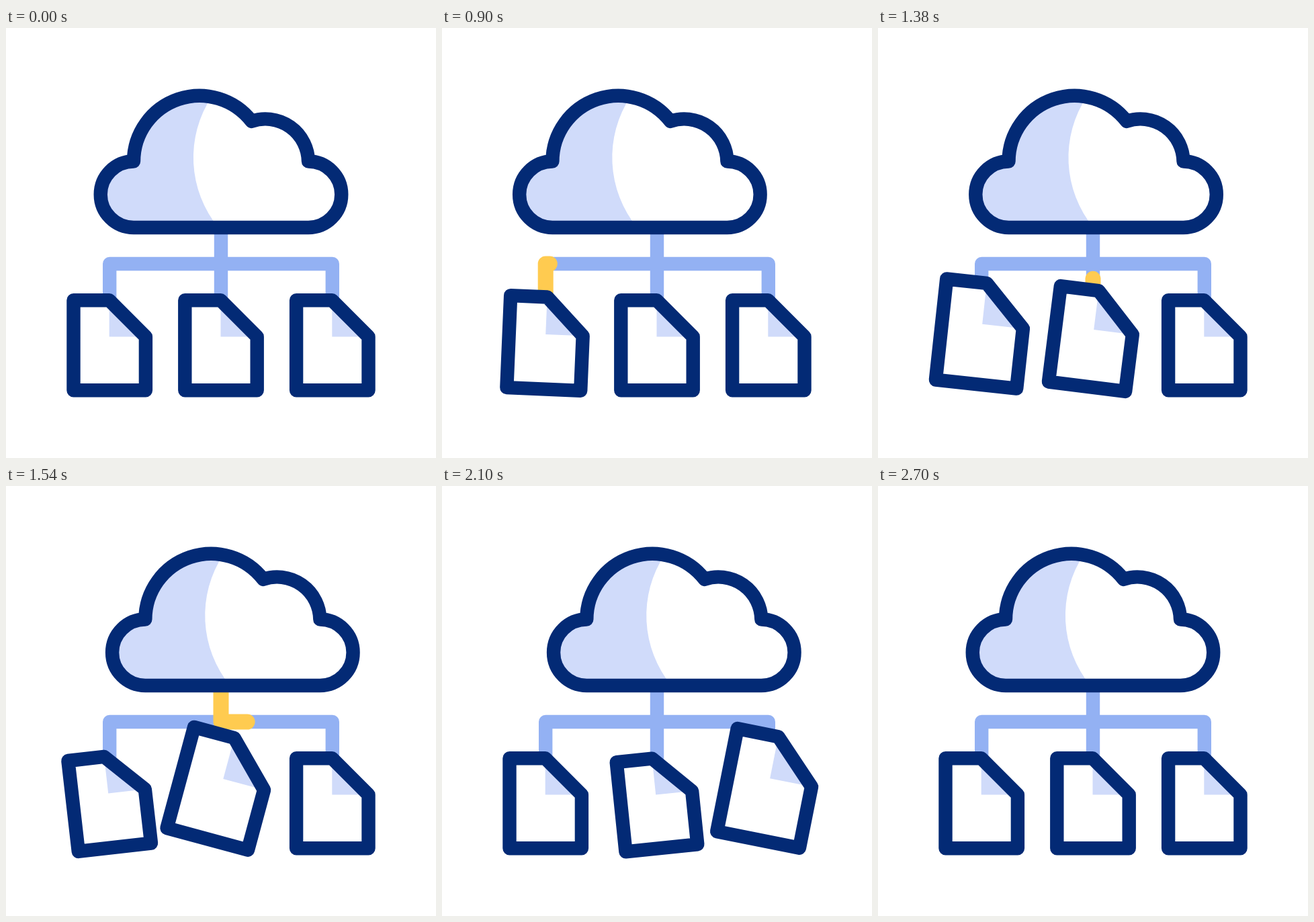
Animation of 640 by 640 pixels, one loop 3000 ms. Source, as an HTML page with a canvas:

```html
<!DOCTYPE html>
<html>
<head>
<meta charset="utf-8">
<style>
  html, body { margin: 0; height: 100%; overflow: hidden; background: #fff; }
  canvas { display: block; }
</style>
</head>
<body>
<canvas id="stage" width="640" height="640"></canvas>
<script>
const ctx = document.getElementById('stage').getContext('2d');
const NAVY = '#032a75', BLUE = '#93b1f3', PALE = '#d0dbfa', YELLOW = '#ffcb50';
const LINE = 20.4, LOOP = 3000;

const cloud = new Path2D('M190 297A49.2 49.2 0 0 1 190 198.5A98 98 0 0 1 365.5 138.8' +
  'A64 64 0 0 1 450 198.5A49.2 49.2 0 0 1 450 297Z');
const cloudShade = new Path2D('M316 297H190A49.2 49.2 0 0 1 190 198.5A98 98 0 0 1 306 102.2' +
  'A165 165 0 0 0 316 297Z');
const wires = new Path2D('M320 297V405M154.2 405V351H485.8V405');

const pageX = [154.2, 320, 485.8], PAGE_Y = 472.2;
const page = [[-53.7, -67], [-0.5, -67], [53.7, -12.7], [53.7, 67], [-53.7, 67]];
const fold = [[-0.5, -67], [-0.5, -12.7], [53.7, -12.7]];

// Keys are [time, value] pairs, eased in and out between neighbours.
function track(keys, t) {
  if (t <= keys[0][0]) return keys[0][1];
  for (let i = 1; i < keys.length; i++) {
    const [t0, a] = keys[i - 1], [t1, b] = keys[i];
    if (t < t1) {
      const p = (t - t0) / (t1 - t0);
      return a + (b - a) * p * p * (3 - 2 * p);
    }
  }
  return keys[keys.length - 1][1];
}

const cloudShift = [[220, 0], [860, -25.6], [900, -25.6], [1760, 25.6], [2060, 25.6], [2700, 0]];
const pageLift = [[800, 0], [1250, 1], [1600, 0]];
const pageTurn = [[800, 0], [1210, 16], [1600, -8], [1930, 0]];
const pulseHead = [[400, 0], [760, 1]];
const pulseTail = [[650, 0], [1010, 1]];

function stroke(path, color, width) {
  ctx.strokeStyle = color;
  ctx.lineWidth = width;
  ctx.stroke(path);
}

function drawPulse(x, t) {
  const length = 108 + Math.abs(x - 320);
  const head = track(pulseHead, t) * length, tail = track(pulseTail, t) * length;
  if (head - tail < 0.1) return;
  ctx.setLineDash([head - tail, 1000]);
  ctx.lineDashOffset = -tail;
  stroke(new Path2D(`M320 297V351${x === 320 ? '' : 'H' + x}V405`), YELLOW, 23);
  ctx.setLineDash([]);
}

function polygon(points, place) {
  const path = new Path2D();
  points.forEach(p => path.lineTo(...place(p)));
  path.closePath();
  return path;
}

function drawPage(x, t) {
  const lift = track(pageLift, t), angle = track(pageTurn, t) * Math.PI / 180;
  const scale = 1 + 0.185 * lift;
  const c = Math.cos(angle) * scale, s = Math.sin(angle) * scale;
  const place = ([px, py]) => [x + c * px - s * py, PAGE_Y - 25 * lift + s * px + c * py];
  const outline = polygon(page, place);
  ctx.fillStyle = '#fff';
  ctx.fill(outline);
  ctx.fillStyle = PALE;
  ctx.fill(polygon(fold, place));
  stroke(outline, NAVY, LINE);
}

function drawCloud(t) {
  ctx.save();
  ctx.translate(track(cloudShift, t), 0);
  ctx.fillStyle = '#fff';
  ctx.fill(cloud);
  ctx.fillStyle = PALE;
  ctx.fill(cloudShade);
  stroke(cloud, NAVY, LINE);
  ctx.restore();
}

function draw() {
  const t = performance.now() % LOOP;
  ctx.clearRect(0, 0, 640, 640);
  ctx.lineCap = ctx.lineJoin = 'round';
  stroke(wires, BLUE, LINE);
  pageX.forEach((x, i) => drawPulse(x, t - 500 * i));
  drawCloud(t);
  pageX.forEach((x, i) => drawPage(x, t - 390 * i));
  requestAnimationFrame(draw);
}
draw();
</script>
</body>
</html>
```
